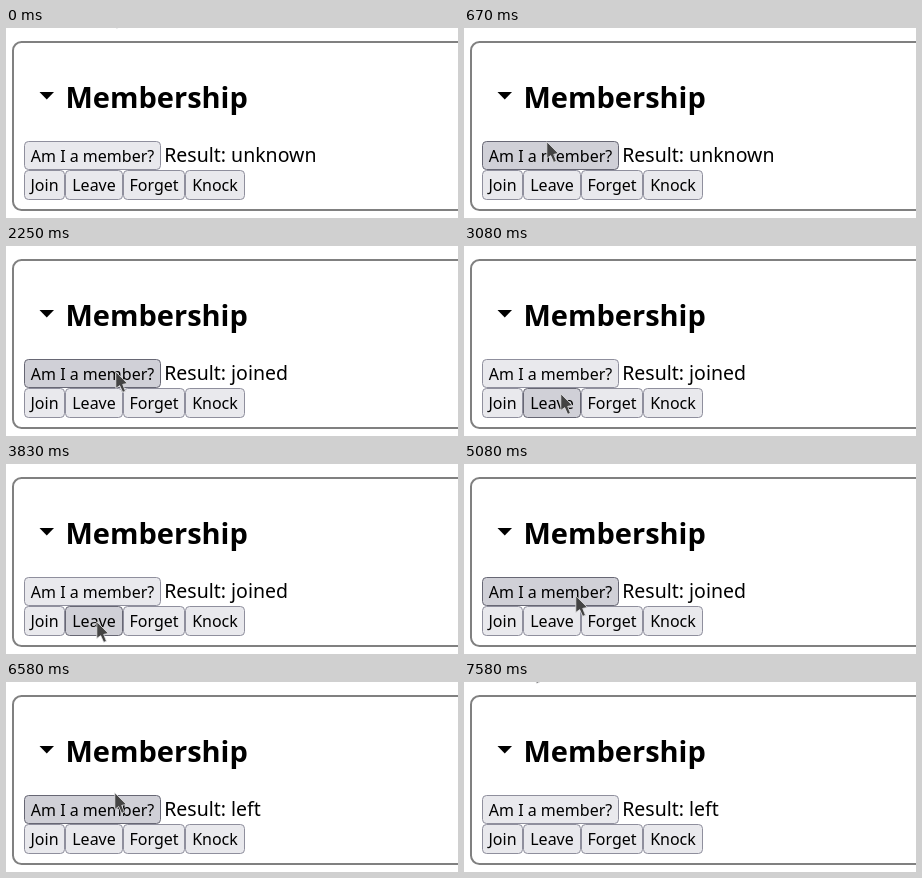
These frames come from a looping animation (452 px wide and 190 px high, 7660 ms). An HTML page:

```html
<!DOCTYPE html>
<html lang="en">
<head>
<meta charset="utf-8">
<title>Membership</title>
<style>
  html, body { margin: 0; width: 100%; height: 100%; overflow: hidden; background: #fff; }
  svg { display: block; width: 452px; height: 190px; font-family: "Noto Sans", sans-serif; }
  text { white-space: pre; }
  h2, .title { font-weight: 700; font-size: 29px; }
  .result { font-size: 19.5px; }
  .btn rect { fill: #e9e9ed; stroke: #8f8f9d; }
  .btn text { font-size: 16px; text-anchor: middle; }
  .btn.hover rect { fill: #d0d0d7; stroke: #676774; }
  .btn.press rect { fill: #b1b1b9; stroke: #484851; }
  .btn.off rect { fill: #f4f4f6; stroke: #d2d2d8; }
  .btn.off text { fill: #8a8a8d; }
</style>
</head>
<body>
<svg viewBox="0 0 452 190">
  <rect x="7" y="14" width="500" height="168" rx="8.5" fill="none" stroke="#808080" stroke-width="2"/>
  <path d="M33.5 64H48L40.75 71.5Z"/>
  <text class="title" x="59.5" y="80">Membership</text>
  <text class="result" x="158.2" y="134">Result: <tspan id="value">unknown</tspan></text>
  <g id="buttons"></g>
  <path id="cursor" d="M.8 .8V17.4L4.7 14.6L7.7 21.3L10.4 20.2L7.7 13.4L12.3 12.4Z"
        fill="#434343" stroke="#e4e4e6" stroke-width=".8" stroke-linejoin="round"/>
</svg>
<script>
const LOOP = 7660, FPS = 12;
const NS = 'http://www.w3.org/2000/svg';
const $ = id => document.getElementById(id);

function add(parent, tag, attrs) {
  const el = document.createElementNS(NS, tag);
  for (const name in attrs) el.setAttribute(name, attrs[name]);
  return parent.appendChild(el);
}

function button(label, left, top, right, bottom) {
  const g = add($('buttons'), 'g', { class: 'btn' });
  add(g, 'rect', { x: left + .5, y: top + .5, width: right - left - 1, height: bottom - top - 1, rx: 4 });
  add(g, 'text', { x: (left + right) / 2, y: top + 21 }).textContent = label;
  return g;
}

const member = button('Am I a member?', 18, 113, 155, 142);
button('Join', 18, 142, 59, 172);
const leave = button('Leave', 59, 142, 117, 172);
button('Forget', 117, 142, 179, 172);
button('Knock', 179, 142, 239, 172);

const linear = u => u;
const easeIn = u => u * u;
const easeOut = u => u * (2 - u);
const smooth = u => u * u * (3 - 2 * u);

// Pointer moves: first tick, last tick, end x, end y, easing
const start = [103, -21];
const moves = [
  [0, 8, 82, 113, smooth],
  [9, 12, 86, 123, smooth],
  [19, 24, 103, 125, smooth],
  [26, 27, 109, 125, linear],
  [32, 40, 90, 157, smooth],
  [50, 58, 104, 125, smooth],
  [59, 61, 111, 131, linear],
  [74, 79, 108, 110, easeIn],
  [79, 84, 79, 11, linear],
  [84, 86, 65, -15, easeOut],
  [88, 91, 65, -20, linear]
];

function pointer(tick) {
  let [x, y] = start;
  for (const [from, to, endX, endY, ease] of moves) {
    if (tick <= from) break;
    const u = ease(Math.min(1, (tick - from) / (to - from)));
    x += (endX - x) * u;
    y += (endY - y) * u;
  }
  return [Math.round(x), Math.round(y)];
}

// Each timeline lists [first tick, state]
const memberStates = [
  [0, ''], [8, 'hover'], [16, 'press'], [17, 'off'], [21, 'hover'], [37, ''],
  [54, 'hover'], [62, 'press'], [63, 'off'], [67, 'hover'], [80, '']
];
const leaveStates = [[0, ''], [37, 'hover'], [43, 'press'], [44, 'hover'], [54, '']];
const values = [[0, 'unknown'], [17, 'checking...'], [21, 'joined'], [63, 'checking...'], [67, 'left']];

function stateAt(timeline, tick) {
  let state;
  for (const [from, value] of timeline) if (tick >= from) state = value;
  return state;
}

// Ticks start on times rounded to 10 ms
function tickAt(ms) {
  const tick = Math.round(ms * FPS / 1000);
  return Math.round(tick * 100 / FPS) * 10 > ms ? tick - 1 : tick;
}

function draw(ms) {
  const tick = tickAt(ms);
  const [x, y] = pointer(tick);
  $('cursor').setAttribute('transform', `translate(${x} ${y})`);
  member.setAttribute('class', 'btn ' + stateAt(memberStates, tick));
  leave.setAttribute('class', 'btn ' + stateAt(leaveStates, tick));
  $('value').textContent = stateAt(values, tick);
}

const t0 = performance.now();
function loop() {
  draw((performance.now() - t0) % LOOP);
  requestAnimationFrame(loop);
}
loop();
</script>
</body>
</html>
```
